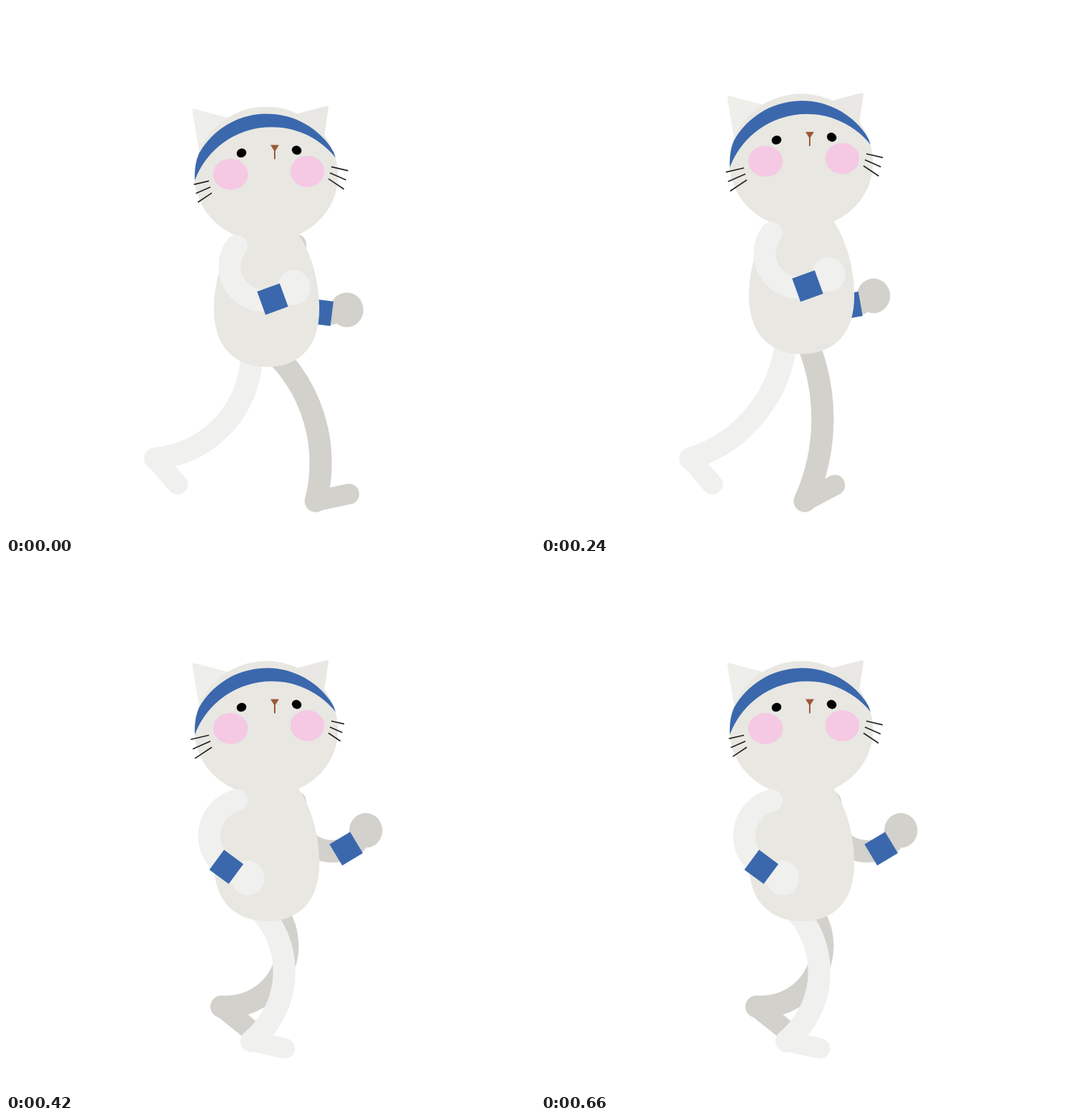
Animation of 748 by 748 pixels, one loop 0.68 s. Source, as an HTML page:

```html
<!DOCTYPE html>
<html lang="en">
<head>
<meta charset="utf-8">
<title>Running cat</title>
<style>
  html, body { margin: 0; width: 100%; height: 100%; overflow: hidden; background: #fff; }
  svg { display: block; width: 100vw; height: 100vh; }
  .dark { --c: #d2d1cb; }
  .light { --c: #f0f0ee; }
  .limb { fill: none; stroke: var(--c); stroke-width: 31.5; stroke-linecap: round; stroke-linejoin: round; }
  .foot { stroke-width: 29; }
  .hand { fill: var(--c); }
  .band { fill: #3b68ad; }
  .skin { fill: #e8e7e2; }
  .ear { stroke-width: 5; stroke-linejoin: round; }
  .whiskers { stroke: #222; stroke-width: 1.7; }
</style>
</head>
<body>
<svg viewBox="0 0 748 748">
  <g id="darkArm" class="dark"></g>
  <g id="darkLeg" class="dark"></g>
  <g id="lightLeg" class="light"></g>
  <g id="torso">
    <path class="skin" d="M369 285L412 302C432 330 443 372 443 410C443 464 414 492 369 492C324 492 294 464 294 410C294 372 306 330 328 302Z"/>
    <path class="ear" fill="#eeeeea" stroke="#eeeeea" d="M266 129.5L313 142L276 190Z"/>
    <path class="ear" fill="#e9e8e4" stroke="#e9e8e4" d="M453.500 125.500L410 137L447 168Z"/>
    <path class="skin" d="M266.5 222A101.5 98 0 0 1 469.5 222A101.5 93 0 0 1 266.5 222Z"/>
    <path class="band" d="M267 228Q266 205 273 190A110 110 0 0 1 459 181Q464 188 466 196A116 116 0 0 0 267 228Z"/>
    <g fill="#f5c8e3">
      <ellipse cx="317.5" cy="219.5" rx="24.5" ry="22"/>
      <ellipse cx="426" cy="215.5" rx="24" ry="22"/>
    </g>
    <ellipse cx="333" cy="189.5" rx="7" ry="6.2" transform="rotate(-25 333 189.5)"/>
    <ellipse cx="411" cy="185.5" rx="7" ry="6.2" transform="rotate(30 411 185.5)"/>
    <path fill="#9c5836" d="M374 178H386L381 186V198H379V186Z"/>
    <path id="whiskers" class="whiskers"/>
    <g id="lightArm" class="light"></g>
  </g>
</svg>
<script>
const STEP = 20, STEPS = 34, CYCLE = 12, LAND = 7;
const $ = id => document.getElementById(id);

// Key poses: step in the cycle, then x, y, angle of the ankle or wrist
const STRIDE = [[0, 438, 700, -12], [5, 211, 640, 49], [8, 282, 603, 61], [12, 373, 700, -28]];
const DARK_SWING = [[0, 444, 433, 7], [5, 515, 351, -73], [9, 481, 404, -31], [12, 435, 424, -10]];
const LIGHT_SWING = [[0, 268, 428, 74], [5, 377, 396, -20], [9, 315, 413, 24], [12, 270, 384, 45]];

function pose(keys, step) {
  const i = Math.max(1, keys.findIndex(k => k[0] >= step));
  const a = keys[i - 1], b = keys[i], k = (step - a[0]) / (b[0] - a[0]);
  return [1, 2, 3].map(j => a[j] + (b[j] - a[j]) * k);
}

// Circular bend that grows as the two ends come closer
function hose(x1, y1, x2, y2, reach, give, sweep) {
  const c = Math.hypot(x2 - x1, y2 - y1);
  const h = Math.sqrt(give * Math.max(6200, reach * reach - c * c));
  const r = (c * c / 4 + h * h) / (2 * h);
  return `M${x1} ${y1}A${r} ${r} 0 0 ${sweep} ${x2} ${y2}`;
}

function polar(x, y, deg, d) {
  const a = deg * Math.PI / 180;
  return [x + d * Math.cos(a), y + d * Math.sin(a)];
}

function makeLeg(id, hipX) {
  const g = $(id);
  g.innerHTML = '<path class="limb"/><path class="limb foot"/>';
  const [leg, foot] = g.children;
  return (step, drop) => {
    const [x, y, a] = pose(STRIDE, step);
    leg.setAttribute('d', hose(hipX, 465 + drop, x, y, 250, .09, 1));
    foot.setAttribute('d', `M${x} ${y}L${polar(x, y, a, 48)}`);
  };
}

function makeArm(id, sx, sy, swing, handTurn, handDist) {
  const g = $(id);
  g.innerHTML = '<path class="limb"/><ellipse class="hand" rx="23.5" ry="24.5"/>' +
    '<rect class="band" x="-17" y="-17.5" width="34" height="35"/>';
  const [arm, hand, band] = g.children;
  return step => {
    const [x, y, a] = pose(swing, step);
    const [hx, hy] = polar(x, y, a + handTurn, handDist);
    arm.setAttribute('d', hose(sx, sy, x, y, 134, .11, 0) + `L${polar(x, y, a, 16)}`);
    hand.setAttribute('cx', hx);
    hand.setAttribute('cy', hy);
    band.setAttribute('transform', `translate(${x} ${y}) rotate(${a})`);
  };
}

// Three hairs fanning out from a cheek
function fan(x, y, side, length) {
  return [0, 1, 2].map(i =>
    `M${x - side * 2 * i} ${y + 8.5 * i}l${side * (26 - i) * length} ${(6 + 5 * i) * length}`
  ).join('');
}

const darkLeg = makeLeg('darkLeg', 372);
const lightLeg = makeLeg('lightLeg', 347);
const darkArm = makeArm('darkArm', 409, 338, DARK_SWING, -12, 38);
const lightArm = makeArm('lightArm', 326, 321, LIGHT_SWING, -9, 34);

function draw(u) {
  // A swing shows its last pose before it wraps; the dark side does so once
  const wrap = n => n && (n - 1) % CYCLE + 1;
  const dark = u <= CYCLE ? u : u % CYCLE;
  const light = wrap(u + CYCLE - LAND);

  // The body sinks after a landing and is back up at the next one
  const beat = wrap(u);
  const left = (beat <= LAND ? LAND : CYCLE) - beat;
  const drop = 21.7 * Math.sin(.29 * left) ** 1.5;

  darkLeg(dark, drop);
  darkArm(dark);
  lightLeg(light, drop);
  lightArm(light);
  $('torso').setAttribute('transform', `translate(0 ${drop})`);

  const turn = 2 * Math.PI * u / STEPS;
  $('whiskers').setAttribute('d',
    fan(287, 229, -1, .92 - .1 * Math.cos(turn)) +
    fan(460, 209, 1, .84 + .15 * Math.sin(turn + .5)));
}

const start = performance.now();
function tick() {
  const t = Math.max(0, performance.now() - start);
  draw(Math.floor(t / STEP) % STEPS);
  requestAnimationFrame(tick);
}
tick();
</script>
</body>
</html>
```
